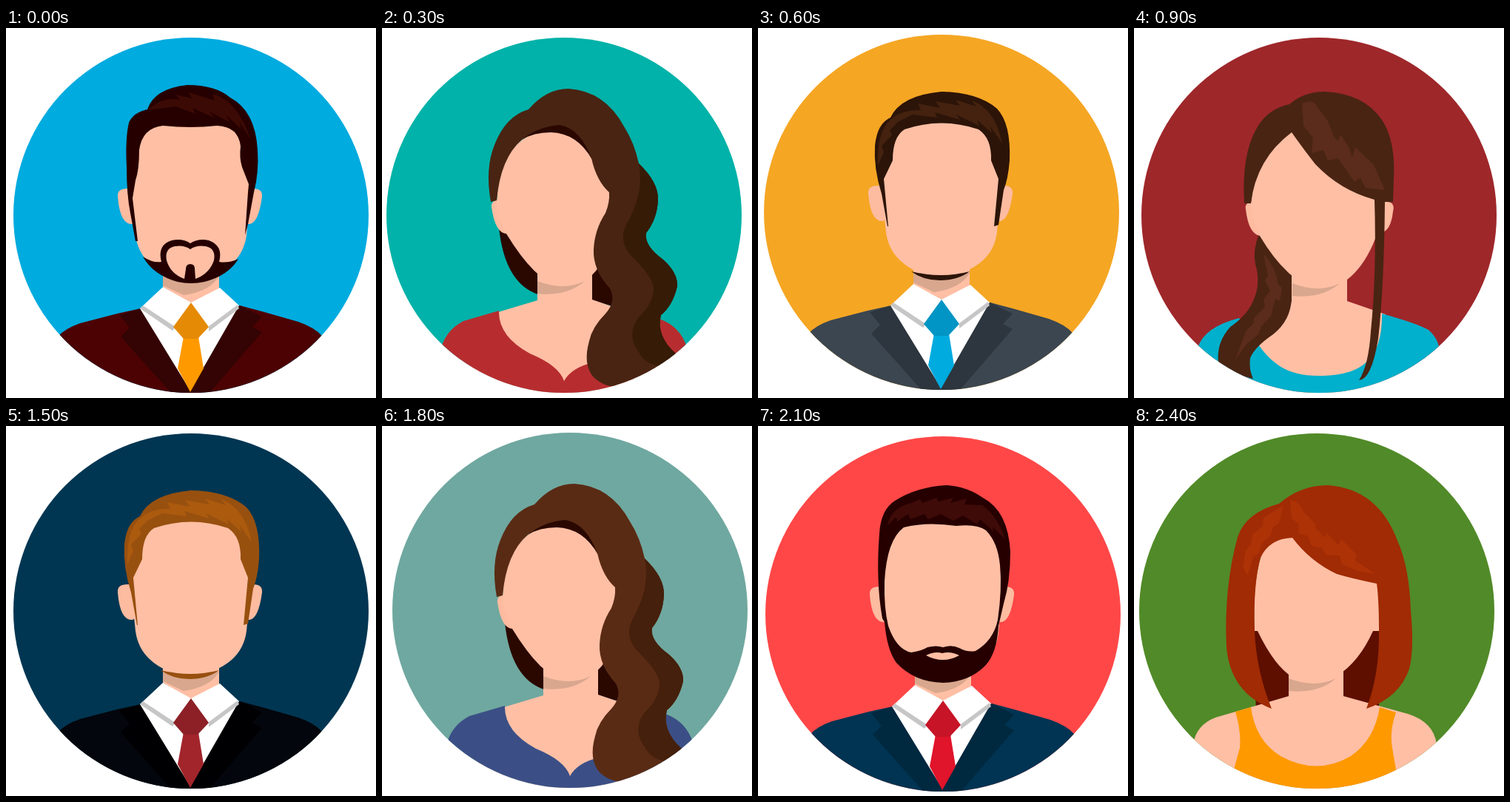
Animation, 500 px wide and 500 px high, one loop 2700 ms. Source, as an HTML page:

```html
<!DOCTYPE html>
<html lang="en">
<head>
<meta charset="utf-8">
<title>Avatars</title>
<style>
html, body { margin: 0; width: 100%; height: 100%; overflow: hidden; background: #fff; }
svg { display: block; width: 100%; height: 100%; }
</style>
</head>
<body>
<svg id="stage" viewBox="0 0 500 500"></svg>
<script>
const SLOT = 300;
const SKIN = '#ffbfa5', EAR = '#fdbba0', SHADE = '#d8a78e';
const path = (fill, d) => `<path fill="${fill}" d="${d}"/>`;
const shift = (x, y, art) => `<g transform="translate(${x} ${y})">${art}</g>`;

// Round badge with everything clipped to its edge
const badge = (id, cx, cy, bg, art) => `<g id="a${id}" display="none">
  <clipPath id="c${id}"><circle cx="${cx}" cy="${cy}" r="240"/></clipPath>
  <g clip-path="url(#c${id})">${path(bg, 'M0 0H500V500H0Z')}${art}</g></g>`;

// Suit, neck, ears and face; hair goes on top
const man = (suit, lapel, tie, knot, hair) =>
  path(suit, 'M182 379L316 375L346 383L395 397Q418 405 428 417V500H70V417Q80 406 100 399L150 386Z') +
  path(lapel, 'M182 379L153 388L167 405L155 417L229 500H269L346 411L333 404L346 390L316 375Z') +
  path(SKIN, 'M212 320H288V352L250 373L212 350Z') +
  path(SHADE, 'M212 335H288Q276 356 240 361L212 348Z') +
  path('#fff', 'M212 350L181 379L249 490L315 375L289 351L250 371Z') +
  path('#c6c6c6', 'M181 379L225 409L229 404L185 375ZM274 410L315 379L313 374L274 403Z') +
  path(tie, 'M240 417H260L267 460L249 492L232 460Z') +
  path(knot, 'M250 371L274 404L259 420H240L226 404Z') +
  path(EAR, 'M164 217Q150 217 151 228Q154 266 171 265L185 255V217ZM334 217Q347 217 346 228Q341 266 327 265L315 255V217Z') +
  path(SKIN, 'M168 215C168 140 172 125 200 125H295C325 125 331 145 331 215L325 280Q322 303 306 318Q282 339 250 339Q216 339 194 318Q178 303 175 280Z') +
  hair;

const sweptHair = (dark, light) =>
  path(dark, 'M175 288L168 250Q163 225 163 188Q161 150 166 128Q172 114 191 110Q200 82 245 77Q283 77 303 94Q337 112 340 165Q342 195 335 222L327 265L323 280L327 222L328 211L319 188Q315 175 317 160Q314 133 285 132Q250 136 212 132Q184 135 180 165Q180 192 175 206L171 230L178 288Z') +
  path(light, 'M191 111Q212 92 235 97L229 90L251 95L247 87L282 98L279 89Q313 98 330 150L315 126L318 137L297 117L302 127L275 113L281 121L252 108L256 116L229 106Z');

const goatee = dark =>
  path(dark, 'M185 309Q199 318 210 316Q204 293 224 287Q239 284 249 291Q260 284 274 287Q294 294 288 316Q301 318 314 312Q300 335 268 343Q250 347 232 343Q199 334 185 309Z') +
  path(SKIN, 'M217 314Q214 298 228 295Q241 293 249 299Q257 293 270 295Q284 298 281 314Q275 332 256 339L255 325Q255 319 249 319Q243 319 243 326L241 339Q222 332 217 314Z');

const shortHair = (dark, light) =>
  path(dark, 'M177 272L169 228Q158 193 160 163Q163 133 181 125Q195 95 250 90Q300 91 325 113Q344 133 342 183Q340 208 334 223L327 270L321 272L327 208L317 183Q318 153 300 141Q250 124 200 141Q184 151 184 183L172 208L178 272Z') +
  path(light, 'M182 127Q197 114 222 115L218 106L248 112L242 103L275 109L269 101L297 110L291 102Q323 114 332 160L316 137L318 146L298 128L301 136L270 121L275 128L241 118L244 125L211 121L191 131L180 142L183 149L169 163L172 172L164 190Q162 144 182 127Z') +
  path(dark, 'M209 333Q250 343 288 333Q272 345 248 345Q225 345 209 333Z');

const fullBeard = (dark, light) =>
  path(dark, 'M168 260Q159 210 164 145Q166 113 185 101Q215 82 255 80Q283 82 304 97Q338 115 341 170Q341 210 332 240L325 270Q323 307 307 324Q285 346 250 347Q211 346 187 320Q174 302 171 265ZM171 210Q170 245 176 270Q187 302 207 306Q221 304 229 299Q241 296 250 299Q262 295 272 300Q283 306 294 304Q318 290 324 262Q330 220 327 188Q324 157 308 141Q296 132 268 135Q228 129 197 137Q174 154 171 210Z') +
  path(light, 'M175 134Q179 111 207 104L219 99L222 104L241 97L244 102L264 97L260 104L282 98L279 106L303 107Q324 122 334 153L317 136L319 143L300 126L296 133L277 121L264 128L247 119L230 126L225 119L206 126L203 119L188 129L187 123Z') +
  path(SKIN, 'M227 310Q239 304 249 307Q260 304 272 310Q250 322 227 310Z');

const chinShade = 'M210 342Q246 356 274 342Q250 363 210 359Z';

const longHair = (hair, side, under, dress) =>
  path(under, 'M158 270Q166 345 211 360H284V368L325 380V300Z') +
  path(SKIN, 'M210 325H284V367L345 388V500H120V395L210 368Z') +
  path(dress, 'M158 382Q157 417 200 440Q239 456 246 477Q256 459 285 452L375 393Q404 404 412 432V500H80V432Q87 408 110 396Z') +
  path(EAR, 'M160 232Q147 232 148 242Q153 278 169 278Z') +
  path(SKIN, 'M155 235Q160 145 225 138Q290 145 310 220L300 310Q282 350 241 350Q207 342 168 278Q156 255 155 235Z') +
  path(SHADE, chinShade) +
  path(under, 'M189 151Q215 122 250 128Q275 135 284 178Q264 142 228 141Q205 141 189 151Z') +
  path(hair, 'M155 233L147 235Q139 190 152 158Q167 119 198 110Q222 82 252 82Q301 85 327 133Q341 155 347 183Q374 209 373 232Q372 258 357 277Q354 294 380 313Q400 331 399 349Q393 375 377 388Q370 416 397 440Q375 469 335 483Q305 490 286 472Q271 455 280 423Q284 404 302 386Q317 369 308 352Q285 327 286 300Q287 273 302 250Q308 235 307 222Q290 207 283 176Q268 136 240 131Q211 133 189 151Q160 176 155 233Z') +
  path(side, 'M347 183Q374 209 373 232Q372 258 357 277Q354 294 380 313Q400 331 399 349Q393 375 377 388Q370 416 397 440L382 458Q356 456 347 438Q330 415 346 392Q367 372 367 352Q366 337 341 312Q317 290 331 264Q355 222 347 183Z');

const ponytail = (hair, light, shirt) =>
  path(SKIN, 'M213 325H288V369L340 387V500H110V405L213 370Z') +
  path(shirt, 'M142 392L166 425C185 452 205 470 250 470C305 470 336 450 335 386Q382 399 398 408Q410 418 413 434V500H86V432Q95 404 142 392Z') +
  path(hair, 'M169 278L213 325V365Q212 395 188 414Q163 431 157 446Q155 461 161 474Q132 468 114 452Q111 425 130 404Q153 388 161 369Q172 345 164 319Q160 301 169 278Z') +
  path(EAR, 'M162 235Q149 235 151 245Q155 281 173 281ZM336 235Q354 233 350 248Q347 276 332 277Z') +
  path(SKIN, 'M158 237Q163 170 213 139L330 225Q334 250 326 285Q300 350 250 355Q207 343 170 281Q159 260 158 237Z') +
  shift(4, 3, path(SHADE, chinShade)) +
  path(hair, 'M149 237Q145 171 166 135Q181 109 210 103Q230 86 257 86Q310 88 335 124Q354 153 351 205L350 235H339Q338 350 330 420Q321 475 304 476Q317 456 320 410Q328 330 325 232Q278 219 245 184Q230 165 213 141Q165 177 158 237Z') +
  path(light, 'M227 102Q243 95 247 106L262 126L270 147L276 153L279 144L290 161L295 175L299 161L324 185L339 219L313 216L306 202L298 208L276 176L262 179L256 165L240 169L242 148L229 132ZM175 305Q194 328 194 345L200 351L197 369L191 366L185 389L172 403L168 414L153 426L137 448L151 410L162 399L162 392L177 377L175 367L184 355L177 341L181 335Z');

const bob = (hair, light, under, top) =>
  path(under, 'M160 277H331V384H165Z') +
  path(SKIN, 'M209 325H283V365L370 389Q405 400 409 430V500H80V430Q84 404 110 394L209 365Z') +
  path(top, 'M137 386L158 380Q164 425 198 446Q247 473 293 446Q325 424 332 380L354 387Q345 413 349 435L354 464V500H135V464L143 435Q145 413 137 386Z') +
  path(SKIN, 'M163 277Q158 190 185 145H225L331 205V277H323Q304 319 275 337Q247 360 215 340Q190 325 167 277Z') +
  shift(-1, -1, path(SHADE, chinShade)) +
  path(hair, 'M186 382Q131 361 125 300Q121 220 140 150Q151 117 196 105Q225 80 262 80Q330 85 356 155Q372 190 374 250Q379 300 372 328Q359 367 314 382Q332 335 331 277Q331 235 328 213Q294 206 274 200Q238 183 214 151Q183 152 171 178Q161 214 163 277Q165 330 186 382Z') +
  path(light, 'M211 100Q224 101 229 116L245 132L246 139L259 151L260 144L276 161L280 153L300 173L299 182L327 200L303 196L281 187L278 175L259 174L254 165L240 162L235 149L223 145L222 132L213 125ZM202 107L196 131L188 137L184 149L173 158L169 172L161 177L154 202L147 191L151 169L158 159L160 147L174 135L175 124Z');

const avatars = [
  [250, 253, '#00abdf', man('#4c0203', '#340303', '#ff9900', '#e58a05', sweptHair('#260000', '#3c0a04') + goatee('#260000'))],
  [246, 253, '#00b2a9', longHair('#492412', '#361b06', '#2a0800', '#b72d2f')],
  [248, 249, '#f5a623', shift(-2, -4, man('#3b4650', '#2d363e', '#00abdf', '#0095c4', shortHair('#2c1408', '#44220f')))],
  [250, 253, '#9e272a', ponytail('#492412', '#5b2c1b', '#00b0cc')],
  [254, 249, '#e8785a', shift(7, -1, bob('#3a1a0c', '#512817', '#220c04', '#00a79d'))],
  [250, 250, '#003652', shift(0, -3, man('#03060c', '#000003', '#a1252b', '#8c2026', shortHair('#98500f', '#ab5a0e')))],
  [254, 249, '#6fa8a0', shift(8, -4, longHair('#5a2b14', '#45200c', '#2a0800', '#3b4f86'))],
  [250, 254, '#ff4747', man('#003452', '#00283f', '#e0142a', '#c71427', fullBeard('#260000', '#3e0b08'))],
  [247, 250, '#518a28', bob('#a02b04', '#ad3206', '#5e0f00', '#ff9900')]
];

const stage = document.getElementById('stage');
stage.innerHTML = avatars.map((a, i) => badge(i, ...a)).join('');
const groups = avatars.map((_, i) => document.getElementById('a' + i));

let shown = 0;
function draw(time) {
  const next = Math.floor(time / SLOT) % groups.length;
  groups[shown].setAttribute('display', 'none');
  groups[next].setAttribute('display', 'inline');
  shown = next;
}
const start = performance.now();
function tick() {
  draw(performance.now() - start);
  requestAnimationFrame(tick);
}
tick();
</script>
</body>
</html>
```
